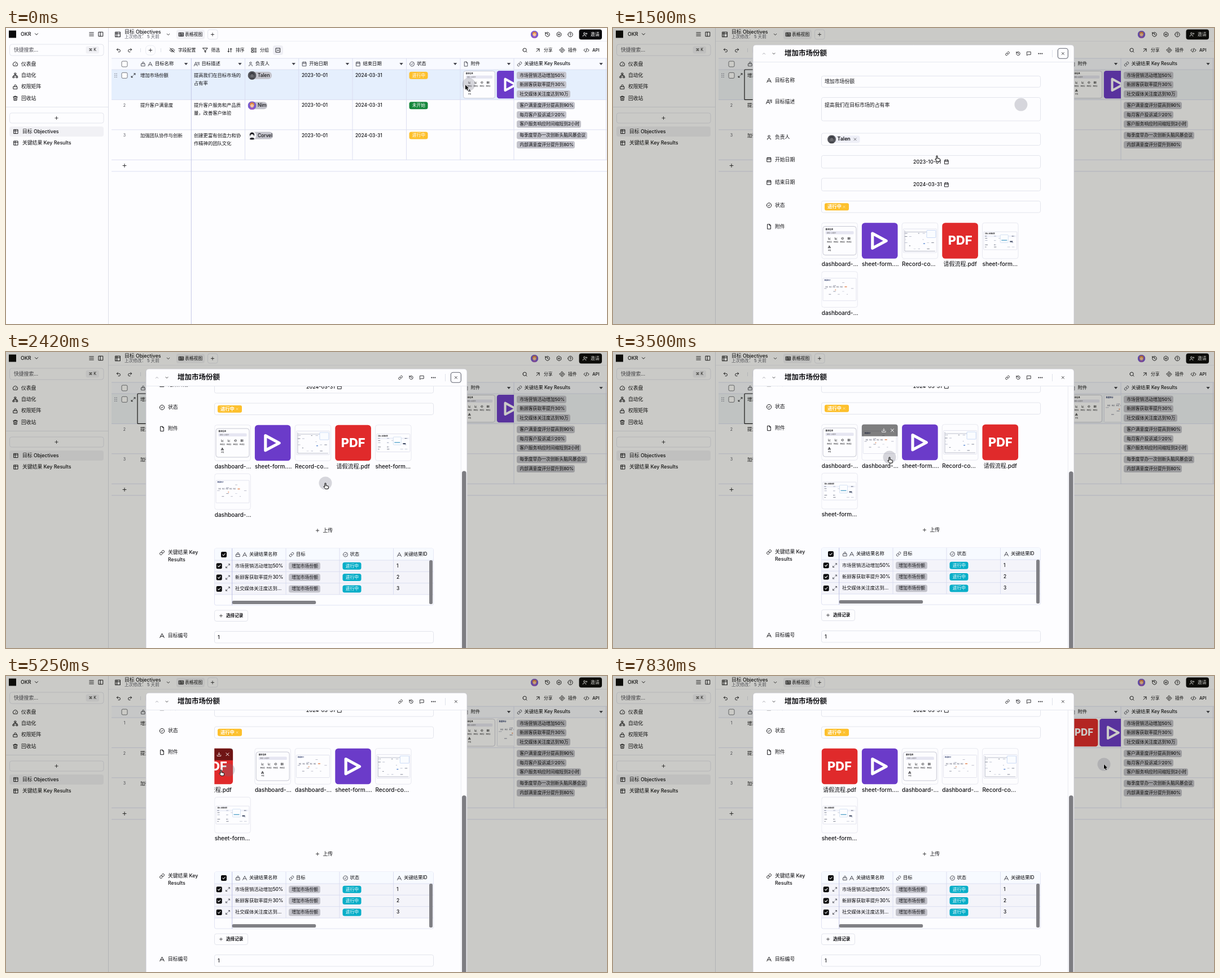
Write an HTML page with a canvas that moves like this. It is 1065 px wide and 526 px high and loops after 8000 ms.

```html
<!DOCTYPE html>
<html lang="zh-CN">
<head>
<meta charset="utf-8">
<title>OKR</title>
<style>
html, body { margin: 0; width: 100%; height: 100%; overflow: hidden; background: #fdfdff; }
canvas { display: block; width: 1065px; height: 526px; }
</style>
</head>
<body>
<canvas></canvas>
<script>
const W = 1065, H = 526, LOOP = 8000;
const canvas = document.querySelector('canvas');
const g = canvas.getContext('2d');
const dpr = window.devicePixelRatio || 1;
canvas.width = W * dpr;
canvas.height = H * dpr;

const FONT = 'Inter, "Noto Sans CJK SC", "Noto Sans CJK", sans-serif';
const INK = '#111114', PAPER = '#fdfdff', RULE = '#d9dcf0', GREY = '#c3c3cb', AMBER = '#fdc02c';
const CIRCLE = 'M2 12a10 10 0 1 0 20 0a10 10 0 1 0-20 0';
const USER = 'M8 7a4 4 0 1 0 8 0a4 4 0 1 0-8 0M5 21v-2a4 4 0 0 1 4-4h6a4 4 0 0 1 4 4v2';

// Icons on a 24 x 24 grid.
const icons = {
  name: 'M3 21 12 3l9 18M6 15h12',
  text: 'M0 21 8 3l7 18M3 15h9M14 5h10M17 10h7M19 15h5',
  lock: 'M4 11h16v10H4zM8 11V7a4 4 0 0 1 8 0v4',
  user: USER,
  invite: USER + 'M19 8h6M22 5v6',
  date: 'M4 4h16v17H4zM4 10h16M8 2v4M16 2v4',
  status: CIRCLE + 'M8 12l3 3 5-6',
  help: CIRCLE + 'M9 9a3 3 0 1 1 3 4v1M12 17v.5',
  file: 'M14 2H5v20h14V7zM14 2v5h5',
  link: 'M10 13a5 5 0 0 0 7.5.5l3-3a5 5 0 0 0-7-7l-1.7 1.7M14 11a5 5 0 0 0-7.5-.5l-3 3a5 5 0 0 0 7 7l1.7-1.7',
  plus: 'M4 12h16M12 4v16',
  down: 'M6 9l6 6 6-6',
  up: 'M6 15l6-6 6 6',
  close: 'M6 6l12 12M18 6L6 18',
  table: 'M3 3h18v18H3zM3 9h18M9 3v18',
  grid: 'M2 4h20v16H2zM2 9h20M2 15h20M9 4v16M15 9v11',
  menu: 'M3 5h18M3 12h18M3 19h18',
  panel: 'M3 3h18v18H3zM10 3v18',
  gauge: 'M12 14l4-4M3.5 19a10 10 0 1 1 17 0z',
  flow: 'M9 2h6v6H9zM2 16h6v6H2zM16 16h6v6h-6zM5 16v-4h14v4M12 8v4',
  trash: 'M3 6h18M8 6V3h8v3M5 6l1 15h12l1-15M10 11v6M14 11v6',
  undo: 'M9 14L4 9l5-5M4 9h10a5 5 0 0 1 0 11h-3',
  redo: 'M15 14l5-5-5-5M20 9H10a5 5 0 0 0 0 11h3',
  hide: 'M2 12c5-9 15-9 20 0c-5 9-15 9-20 0M9 12a3 3 0 1 0 6 0M3 3l18 18',
  filter: 'M2 3h20l-8 10v8l-4-2v-6z',
  sort: 'M3 16l4 4 4-4M7 20V4M21 8l-4-4-4 4M17 4v16',
  group: 'M2 3h8v7H2zM2 14h8v7H2zM14 4h8M14 9h8M14 15h8M14 20h8',
  height: 'M3 3h18v18H3zM8 12h8',
  search: 'M3 11a8 8 0 1 0 16 0a8 8 0 1 0-16 0M21 21l-4.3-4.3',
  share: 'M7 6h11v11M6 18L18 6',
  plugin: 'M12 1l4 4-4 4-4-4zM12 15l4 4-4 4-4-4zM5 8l4 4-4 4-4-4zM19 8l4 4-4 4-4-4z',
  code: 'M17 18l6-6-6-6M7 6l-6 6 6 6M14 4l-4 16',
  history: 'M3 12a9 9 0 1 0 3-6.7L3 8M3 3v5h5M12 7v5l4 2',
  gear: 'M9 12a3 3 0 1 0 6 0a3 3 0 1 0-6 0M12 2l8.7 5v10L12 22l-8.7-5V7z',
  message: 'M3 3h18v14H7l-4 4z',
  expand: 'M15 3h6v6M9 21H3v-6M21 3l-7 7M3 21l7-7',
  download: 'M21 15v6H3v-6M7 10l5 5 5-5M12 15V3',
  tick: 'M4 12l6 6L20 6',
  chart: 'M3 3v18h18M8 16l4-5 3 3 5-7'
};
for (const key in icons) icons[key] = new Path2D(icons[key]);
const ARROW = new Path2D('M0 0V9.5L2.2 7.6 3.7 11 5.3 10.3 3.8 7H6.9Z');
const HAND = new Path2D('M-1 1a1 1 0 0 1 2 0v4l4.4 1q1 .4.8 1.5l-.8 3.8H0L-3.4 7q.2-1.4 2.4 0z');

// Drawing helpers
function text(s, x, y, size, color = INK, weight = 500, align = 'left') {
  g.font = `${weight} ${size}px ${FONT}`;
  g.fillStyle = color;
  g.textAlign = align;
  g.textBaseline = 'middle';
  g.fillText(s, x, y);
}
function box(x, y, w, h, r, fill, stroke, width = 0.8) {
  g.beginPath();
  g.roundRect(x, y, w, h, r);
  if (fill) { g.fillStyle = fill; g.fill(); }
  if (stroke) { g.strokeStyle = stroke; g.lineWidth = width; g.stroke(); }
}
function line(x1, y1, x2, y2, color = RULE) {
  g.beginPath();
  g.moveTo(x1, y1);
  g.lineTo(x2, y2);
  g.strokeStyle = color;
  g.lineWidth = 0.9;
  g.stroke();
}
function disc(x, y, r, color) {
  g.beginPath();
  g.arc(x, y, r, 0, 7);
  g.fillStyle = color;
  g.fill();
}
function icon(name, x, y, size = 10, color = INK, width = 2.3) {
  g.save();
  g.translate(x - size / 2, y - size / 2);
  g.scale(size / 24, size / 24);
  g.lineWidth = width;
  g.lineCap = g.lineJoin = 'round';
  g.strokeStyle = color;
  g.stroke(icons[name]);
  g.restore();
}
function chip(s, x, y, w, fill, color = INK) {
  box(x, y - 6.5, w, 13, 3.5, fill);
  text(s, x + 5.2, y, 7.8, color);
}
function checkbox(x, y) {
  box(x - 5, y - 5, 10, 10, 2, '#08080a');
  icon('tick', x, y, 7, '#fff', 3.5);
}
function clipTo(x, y, w, h) {
  g.beginPath();
  g.rect(x, y, w, h);
  g.clip();
}
function avatar(kind, x, y, r) {
  g.save();
  g.beginPath();
  g.arc(x, y, r, 0, 7);
  g.clip();
  const [back, hair, face, body] = [
    ['#55565c', '#3b3c42', '#6b6b70', '#47484e'],
    ['#7a5bd0', '#d98345', '#f6c39c', '#9a5bc0'],
    ['#f3f3f6', '#1d1d22', '#fafafa', '#2a2a30']][kind];
  box(x - r, y - r, 2 * r, 2 * r, 0, back);
  disc(x, y + r * 1.1, r * 0.65, body);
  disc(x, y - r * 0.2, r * 0.55, hair);
  disc(x, y + r * 0.08, r * 0.4, face);
  g.restore();
}

// Timing helpers
const clamp = u => Math.min(1, Math.max(0, u));
const ease = u => (u = clamp(u), u * u * (3 - 2 * u));
const mix = (a, b, u) => a.map((v, i) => v + (b[i] - v) * u);
function follow(keys, t) {
  if (t <= keys[0][0]) return keys[0].slice(1);
  for (let i = 1; i < keys.length; i++) {
    const [a, b] = [keys[i - 1], keys[i]];
    if (t < b[0]) return mix(a.slice(1), b.slice(1), ease((t - a[0]) / (b[0] - a[0])));
  }
  return keys[keys.length - 1].slice(1);
}
const pointer = t => follow([
  [-83, 820, 100], [0, 814, 101], [80, 806, 99], [330, 806, 99], [670, 226, 84], [900, 226, 84],
  [1417, 723, 136], [1500, 574, 227], [1583, 566, 233], [2500, 566, 233], [2720, 420, 270],
  [2830, 420, 270], [3250, 491, 184], [3400, 490, 187], [3920, 490, 187], [4420, 697, 167],
  [4580, 697, 167], [5250, 381, 167], [5580, 381, 167], [5900, 597.5, 163], [6150, 597.5, 163],
  [6420, 490, 163], [6580, 456, 163], [7170, 456, 163], [7460, 650, 212], [7745, 870, 157]
], t);
const scrollAt = t => follow([[1600, 0], [2420, 216.5], [2500, 217.5]], t)[0];

// Attachments: slots lists [time, slot]; a drag ends at the time of one slot change.
const TILE = 63.6;
const files = [
  { kind: 'sheet', label: 'sheet-form...', slots: [[0, 4], [3080, 5]] },
  { kind: 'record', label: 'Record-co...', slots: [[0, 2], [3080, 3], [4720, 4]] },
  { kind: 'board', label: 'dashboard-...', slots: [[0, 5], [3250, 1], [4940, 2], [6254, 3]], drag: [2830, 3250] },
  { kind: 'dash', label: 'dashboard-...', slots: [[0, 0], [5050, 1], [6389, 2]] },
  { kind: 'play', label: 'sheet-form....', slots: [[0, 1], [3080, 2], [4840, 3], [6650, 1]], drag: [6150, 6650] },
  { kind: 'pdf', label: '请假流程.pdf', slots: [[0, 3], [3080, 4], [5400, 0]], drag: [4580, 5400] }
];
const slotPoint = n => [369.7 + 71.2 * (n % 5), 346.2 + 86.6 * Math.floor(n / 5)];
const dragging = (file, t) => file.drag && t >= file.drag[0] && t < file.drag[1];
function dragPoint(file, t) {
  const home = filePoint(file, file.drag[0] - 1);
  const from = pointer(file.drag[0]), to = pointer(t);
  return home.map((v, i) => v + to[i] - from[i]);
}
function filePoint(file, t) {
  if (dragging(file, t)) return dragPoint(file, t);
  let p = slotPoint(file.slots[0][1]);
  for (const [start, slot] of file.slots.slice(1)) {
    if (t < start) break;
    const from = file.drag && file.drag[1] === start ? dragPoint(file, start) : p;
    p = mix(from, slotPoint(slot), ease((t - start) / 200));
  }
  return p;
}

const pictureHeight = { dash: 52, board: 41, record: 43, sheet: 33 };
function marks(seed, count, w, h, colors) {
  const random = () => (seed = seed * 16807 % 2147483647) / 2147483647;
  for (let i = 0; i < count; i++) {
    g.fillStyle = colors[i % colors.length];
    g.fillRect(3 + Math.floor(random() * 7) * w / 7.6, 8 + Math.floor(random() * 6) * (h - 10) / 6, 2 + random() * 3, 0.9);
  }
}
// A picture is 60 units wide before scaling.
function picture(kind, x, y, scale) {
  const h = pictureHeight[kind];
  g.save();
  g.translate(x, y);
  g.scale(scale, scale);
  box(0.5, 0.5, 59, h - 1, kind === 'dash' ? 4 : 1, '#fdfdff', kind === 'dash' ? '#b9bac8' : '#dcdeea');
  if (kind === 'dash') {
    text('基本信息', 5, 5.5, 3.4, INK, 700);
    box(5, 9, 50, 5.5, 1.5, '#e6e6f2');
    text('请输入关键字', 7, 11.8, 2.8, '#666');
    ['chart', 'chart', 'status', 'group'].forEach((name, i) => {
      icon(name, 12 + 11.6 * i, 22, 4.5, INK, 3);
      text('数据图', 12 + 11.6 * i, 28.5, 2.8, INK, 400, 'center');
    });
    icon('flow', 12, 37, 4.5, INK, 3);
    text('流程', 12, 43, 2.8, INK, 400, 'center');
  } else if (kind === 'board') {
    text('数据统计', 3, 4, 2.8, '#33406e', 700);
    for (let i = 0; i < 5; i++) text('数据', 5 + 6.5 * i, 16, 2.2, '#55586a');
    marks(71, 12, 60, 41, ['#8b8e9e', '#b6b8c6', '#d0d2de']);
    g.fillStyle = '#e88f60';
    g.fillRect(39, 15, 4, 1.6);
    g.fillRect(22, 20.5, 1.6, 1.6);
  } else if (kind === 'record') {
    line(3, 3, 3, 40, '#b4b7c6');
    line(3, 6, 57, 6, '#b4b7c6');
    marks(17, 18, 60, 43, ['#777c8c', '#b5bacb', '#cfd2dc']);
    box(42, 3, 16, 13, 1, '#fafcff', '#a9c5ee', 0.6);
    g.fillStyle = '#4f80cf';
    g.fillRect(36, 26, 3, 1.3);
    line(3, 40, 57, 40, '#b4b7c6');
  } else {
    text('目标 关键结果', 3, 4, 2.8, INK, 600);
    box(2, 7, 56, 3, 0, '#f0f2fa');
    marks(29, 20, 60, 33, ['#6a6f7e', '#aab0c4', '#c4c8d6']);
    box(30, 6, 14, 14, 1, '#fcfdff', '#bcd0ea', 0.6);
    g.fillStyle = '#5aa6cc';
    g.fillRect(32, 15, 10, 1.4);
    g.fillStyle = '#3a4560';
    g.fillRect(47, 17, 5, 2);
  }
  g.restore();
}
function fileBadge(kind, x, y, size) {
  g.save();
  g.translate(x, y);
  g.scale(size / 64, size / 64);
  box(0, 0, 64, 64, 5.5, kind === 'pdf' ? '#e02a2b' : '#6b3bc9');
  if (kind === 'pdf') text('PDF', 32, 32.5, 22, '#fff', 800, 'center');
  else {
    g.beginPath();
    g.moveTo(19, 19);
    g.lineTo(19, 45.4);
    g.lineTo(43.5, 32.2);
    g.closePath();
    g.lineWidth = 5.2;
    g.lineJoin = 'round';
    g.strokeStyle = '#fff';
    g.stroke();
  }
  g.restore();
}
function fileTile(file, x, y, hover) {
  const h = pictureHeight[file.kind];
  if (h) {
    box(x, y, TILE, TILE, 4, PAPER, '#e2e4ec');
    picture(file.kind, x + 1.8, y + (TILE - h) / 2, 1);
  } else fileBadge(file.kind, x, y, TILE);
  if (hover) {
    box(x, y, TILE, 21, [4, 4, 0, 0], 'rgba(0,0,0,.5)');
    icon('download', x + 39, y + 10.5, 8.5, '#fff');
    icon('close', x + 54, y + 10.5, 10, '#fff');
  }
  if (file.kind === 'pdf') text(file.label, x + TILE / 2, y + 74, 10, INK, 500, 'center');
  else text(file.label, x, y + 74, 10);
}

function sidebar() {
  box(5, 4.5, 13, 13, 0, '#0a0a0c');
  text('OKR', 26, 11, 8.8);
  icon('down', 54, 11, 10);
  icon('menu', 151.5, 11, 10);
  icon('panel', 168, 11, 10);
  box(6.5, 29, 166.5, 20, 4, null, '#dcdfe8');
  text('快捷搜索...', 14, 39, 8.8, '#4d4d55');
  box(141.5, 32.5, 23.5, 13, 3, '#f1f1f5');
  text('⌘ K', 153.3, 39, 7, '#333', 500, 'center');
  [['gauge', '仪表盘'], ['flow', '自动化'], ['lock', '权限矩阵'], ['trash', '回收站']].forEach(([name, label], i) => {
    icon(name, 16.5, 64 + 20.3 * i, 10);
    text(label, 27, 64 + 20.3 * i, 8.8);
  });
  line(0, 140.5, 181, 140.5, '#e0e2ea');
  box(6.5, 151, 166.5, 18, 3.5, null, '#dcdfe8');
  icon('plus', 89.5, 160, 8);
  box(6, 175, 167, 18, 4, '#f1f1f5');
  icon('table', 17.5, 184, 9.5);
  text('目标 Objectives', 29, 184, 8.8);
  icon('table', 17.5, 204.5, 9.5);
  text('关键结果 Key Results', 29, 204.5, 8.8);
  line(181.5, 0, 181.5, H, '#dadce6');
}

function toolbar() {
  icon('table', 198, 11.5, 11.5);
  text('目标 Objectives', 210, 7.5, 8.8);
  text('上次修改： 5 天前', 210, 16, 7.6, '#60626c');
  icon('down', 287.5, 11.5, 9);
  box(302, 3, 50, 17, 3.5, '#f1f1f5');
  icon('grid', 310.5, 11.5, 9.5);
  text('表格视图', 317, 11.5, 7.8);
  box(357.5, 3, 17.5, 17, 3.5, null, '#dcdfe8');
  icon('plus', 366, 11.5, 8);
  avatar(1, 936.5, 11.5, 6.8);
  icon('history', 959.5, 11.5, 10);
  icon('gear', 980, 11.5, 10);
  icon('help', 1000, 11.5, 10);
  box(1015.5, 2.5, 40.5, 18, 4, '#0a0a0c');
  icon('invite', 1025, 11.5, 9, '#fff');
  text('邀请', 1036, 11.5, 7.8, '#fff');
  line(182, 23.5, W, 23.5, '#ebecf3');

  icon('undo', 199.5, 39.5, 9.5);
  icon('redo', 219.5, 39.5, 9.5);
  line(238.5, 36, 238.5, 43, '#dcdfe8');
  box(247.5, 31, 17, 17, 6, null, '#e4e6ee');
  icon('plus', 256, 39.5, 8.5);
  line(274.5, 36, 274.5, 43, '#dcdfe8');
  box(473, 31, 18, 17, 4, '#eeeef4');
  icon('height', 482, 39.5, 9.5);
  icon('search', 919.5, 39.5, 9.5);
  [['hide', 294.5, '字段配置'], ['filter', 353, '筛选'], ['sort', 396.5, '排序'], ['group', 439.5, '分组'],
   ['share', 942.5, '分享'], ['plugin', 985.5, '插件'], ['code', 1028.5, 'API']].forEach(([name, x, label]) => {
    icon(name, x, 39.5, 10);
    text(label, x + 10.5, 39.5, 7.8);
  });
}

const columns = [233, 328, 423.5, 518.7, 614, 709.5, 805, 900, 1063.5];
const headers = [['name', '目标名称'], ['text', '目标描述'], ['user', '负责人'], ['date', '开始日期'],
  ['date', '结束日期'], ['status', '状态'], ['file', '附件'], ['link', '关键结果 Key Results']];
const rows = [
  { name: '增加市场份额', about: ['提高我们在目标市场的', '占有率'], owner: 'Talen', pill: 40, state: '进行中',
    results: [['市场营销活动增加50%', 88], ['新顾客获取率提升30%', 88], ['社交媒体关注度达到10万', 95]] },
  { name: '提升客户满意度', about: ['提升客户服务和产品质', '量，改善客户体验'], owner: 'Nim', pill: 32, state: '未开始',
    results: [['客户满意度评分提高到90%', 103], ['每月客户投诉减少20%', 88], ['客户服务响应时间缩短到2小时', 114]] },
  { name: '加强团队协作与创新', about: ['创建更富有创造力和协', '作精神的团队文化'], owner: 'Corvel', pill: 42, state: '进行中',
    results: [['每季度举办一次创新头脑风暴会议', 125], ['内部满意度评分提升到80%', 103]] }
];
function cellFiles(t) {
  const order = t < 3300 ? ['dash', 'play'] : t < 5450 ? ['dash', 'board']
    : t < 6800 ? ['pdf', 'dash'] : ['pdf', 'play'];
  g.save();
  clipTo(805, 74, 95, 53);
  let x = 810;
  for (const kind of order) {
    const h = pictureHeight[kind];
    if (h) picture(kind, x, 76, 49.3 / h);
    else fileBadge(kind, x, 76, 49.3);
    x += (h ? 60 * 49.3 / h : 49.3) + 3;
  }
  g.restore();
}
function table(t) {
  const active = t < 4000;
  box(187, 54, W - 187, 20, 0, '#f8faff');
  if (active) box(187, 74, W - 187, 53.4, 0, t < 830 ? '#e5effd' : '#f1f4f8');
  for (const y of [54, 74, 127.4, 180.8, 234.3, 254.8]) line(187, y, W, y);
  for (const x of columns.slice(2)) line(x, 54, x, 234.3);
  line(328.3, 54, 328.3, H, '#bfc1e4');
  box(205, 59, 10, 10, 2, '#fff', '#55565e');
  icon('lock', 243, 64, 9.5, '#44454d');
  headers.forEach(([name, label], i) => {
    const x = columns[i] + (i ? 10 : 22.5), end = columns[i + 1] - 9;
    icon(name, x, 64, 9.5, '#44454d');
    text(label, x + 8.5, 64, 8.3);
    g.beginPath();
    g.moveTo(end - 3.2, 62);
    g.lineTo(end + 3.2, 62);
    g.lineTo(end, 66);
    g.fillStyle = '#44454d';
    g.fill();
  });
  rows.forEach((row, i) => {
    const y = 84.3 + 53.4 * i;
    if (i || !active) text(i + 1, 210, y, 7, '#50515a', 400, 'center');
    else {
      for (let k = 0; k < 6; k++) disc(193 + 3 * (k % 2), y - 3 + 3 * (k >> 1), 0.8, '#777a88');
      box(205, y - 5, 10, 10, 2, '#fff', '#55565e');
      icon('expand', 225.5, y, 9);
    }
    text(row.name, 238, y, 8.3);
    row.about.forEach((s, k) => text(s, 333, y + 14 * k, 8.3));
    box(431, y - 6.5, row.pill, 13, 6, GREY);
    avatar(i, 436, y, 7.5);
    text(row.owner, 446, y, 8.3);
    text('2023-10-01', 524, y, 8.3);
    text('2024-03-31', 619, y, 8.3);
    chip(row.state, 714.5, y, 33, row.state === '未开始' ? '#15873b' : AMBER, '#fff');
    row.results.forEach(([s, w], k) => chip(s, 905, y + 16.5 * k, w, GREY));
  });
  cellFiles(t);
  if (active && t > 750) box(233, 74, 95, 53.4, 1, null, '#16161a', 1.2);
  icon('plus', 210, 244.5, 9);
}

function linkedTable() {
  const top = 565.5;
  g.save();
  box(369.5, top, 388, 101, 3, PAPER, RULE);
  g.clip();
  box(369.5, top, 388, 21, 0, '#f7faff');
  box(369.5, top + 21, 388, 61, 0, '#f4f4fa');
  for (const y of [21, 41.3, 61.7, 82]) line(369.5, top + y, 757.5, top + y);
  for (const x of [496, 591, 686.5]) line(x, top, x, top + 82);
  line(400.7, top, 400.7, top + 101, '#b9bce2');
  checkbox(386, top + 11);
  icon('lock', 411, top + 11, 9.5, '#44454d');
  [['name', 423, '关键结果名称'], ['link', 506, '目标'], ['status', 601.5, '状态'], ['name', 697, '关键结果ID']].forEach(([name, x, label]) => {
    icon(name, x, top + 11, 9.5, '#44454d');
    text(label, x + 8, top + 11, 8.3);
  });
  ['市场营销活动增加50%', '新顾客获取率提升30%', '社交媒体关注度达到...'].forEach((s, i) => {
    const y = top + 31.2 + 20.4 * i;
    checkbox(377.7, y);
    icon('expand', 393, y, 9, '#44454d');
    text(s, 406, y, 8.3);
    chip('增加市场份额', 501, y, 56, GREY);
    chip('进行中', 596.5, y, 33, '#08aec8', '#fff');
    text(i + 1, 692, y, 8.3);
  });
  box(750, top + 21, 6, 78, 2.5, '#808085');
  box(400.7, top + 93, 148.5, 6, 2.5, '#808085');
  g.restore();
}

function form(t, scroll) {
  const field = (y, h) => box(369.5, y, 388, h, 3, null, '#dcdfe8');
  [['name', 93, '目标名称'], ['text', 131, '目标描述'], ['user', 194.5, '负责人'], ['date', 234, '开始日期'], ['date', 274.5, '结束日期'],
   ['status', 315, '状态'], ['file', 353, '附件'], ['link', 573, '关键结果 Key'], ['name', 720.5, '目标编号']].forEach(([name, y, label]) => {
    icon(name, 276.5, y, 10);
    text(label, 287, y, 8.8);
  });
  text('Results', 287, 586, 8.8);
  [[85.3, 20], [123.5, 41.5], [187, 21.5], [226.5, 22.5], [267, 22.5], [307.5, 20.5], [713, 20.5]].forEach(f => field(...f));
  text('增加市场份额', 375, 95.5, 8.9);
  text('提高我们在目标市场的占有率', 375, 137, 8.9);
  box(381, 191.3, 56.5, 13, 4, '#eeeff7');
  avatar(0, 387.5, 197.7, 7.5);
  text('Talen', 397.5, 197.7, 8.9, INK, 600);
  icon('close', 429, 197.7, 8, '#55565e');
  [['2023-10-01', 238], ['2024-03-31', 278.5]].forEach(([s, y]) => {
    text(s, 532, y, 8.9);
    icon('date', 591, y, 9.5);
  });
  box(375, 311.2, 43, 13, 3, AMBER);
  text('进行中', 380, 317.8, 8.3, '#fff', 600);
  icon('close', 409.5, 317.8, 6.5, '#fff6d8');

  const [px, py] = pointer(t);
  g.save();
  clipTo(369.3, 330, 389, 260);
  const held = files.find(f => dragging(f, t));
  const ordered = files.filter(f => f !== held).concat(held || []);
  for (const file of ordered) {
    const [x, y] = filePoint(file, t);
    const under = px > x && px < x + TILE && py + scroll > y && py + scroll < y + TILE;
    fileTile(file, x, y, file === held || (!held && under));
  }
  g.restore();
  icon('plus', 552, 533.7, 8);
  text('上传', 561.5, 533.7, 8.9);
  linkedTable();
  box(369.5, 675.5, 59, 19.5, 3.5, null, '#dcdfe8');
  icon('plus', 381, 685.2, 7.5);
  text('选择记录', 390, 685.2, 7.6, INK, 600);
  text('1', 375, 723.5, 8.9);
}

function dialog(t) {
  const shown = ease((t - 810) / 200), scroll = scrollAt(t);
  if (!shown) return;
  box(0, 0, W, H, 0, `rgba(20,20,0,${0.22 * shown})`);
  g.save();
  g.globalAlpha = shown;
  g.translate(532.5, 290);
  g.scale(0.95 + 0.05 * shown, 0.95 + 0.05 * shown);
  g.translate(-532.5, -290);
  box(248, 30, 569, 530, 5, PAPER, '#c4c5cc');
  icon('up', 267.5, 45.5, 8, '#8b8c94');
  icon('down', 285, 45.5, 8);
  text('增加市场份额', 304, 45.7, 12.5, INK, 700);
  icon('link', 699, 45.5, 8.5);
  icon('history', 718, 45.5, 8.5);
  icon('message', 737, 45.5, 8.5);
  for (const dx of [-3, 0, 3]) disc(757.3 + dx, 45.5, 0.95, INK);
  line(778.5, 39, 778.5, 52, '#dcdfe8');
  if (t < 2750) box(788.3, 36.3, 18, 18, 4, null, '#60636f', 1.1);
  icon('close', 797.3, 45.4, 8);
  line(248, 60.5, 817, 60.5, '#e4e6ee');
  g.save();
  clipTo(248, 61, 569, H - 61);
  if (scroll > 0) {
    line(806.3, 61, 806.3, H, '#e6e7ee');
    box(808, 61 + scroll * 0.695, 7.5, 322, 3.5, '#7d7d82');
  }
  g.translate(0, -scroll);
  form(t, scroll);
  g.restore();
  g.restore();
}

function cursor(t) {
  const [x, y] = pointer(t);
  disc(...pointer(t - 83), 11.5, 'rgba(110,110,125,.27)');
  const arrow = t < 1000 || x > 817;
  g.save();
  g.translate(x, y);
  g.scale(0.9, 0.9);
  g.lineJoin = 'round';
  g.lineWidth = 1;
  g.strokeStyle = arrow ? '#fff' : '#111';
  g.fillStyle = arrow ? '#000' : '#fff';
  const shape = arrow ? ARROW : HAND;
  g.stroke(shape);
  g.fill(shape);
  if (!arrow) g.stroke(shape);
  g.restore();
}

function draw() {
  const t = performance.now() % LOOP;
  g.setTransform(dpr, 0, 0, dpr, 0, 0);
  box(0, 0, W, H, 0, PAPER);
  sidebar();
  toolbar();
  table(t);
  dialog(t);
  cursor(t);
  requestAnimationFrame(draw);
}
draw();
</script>
</body>
</html>
```
